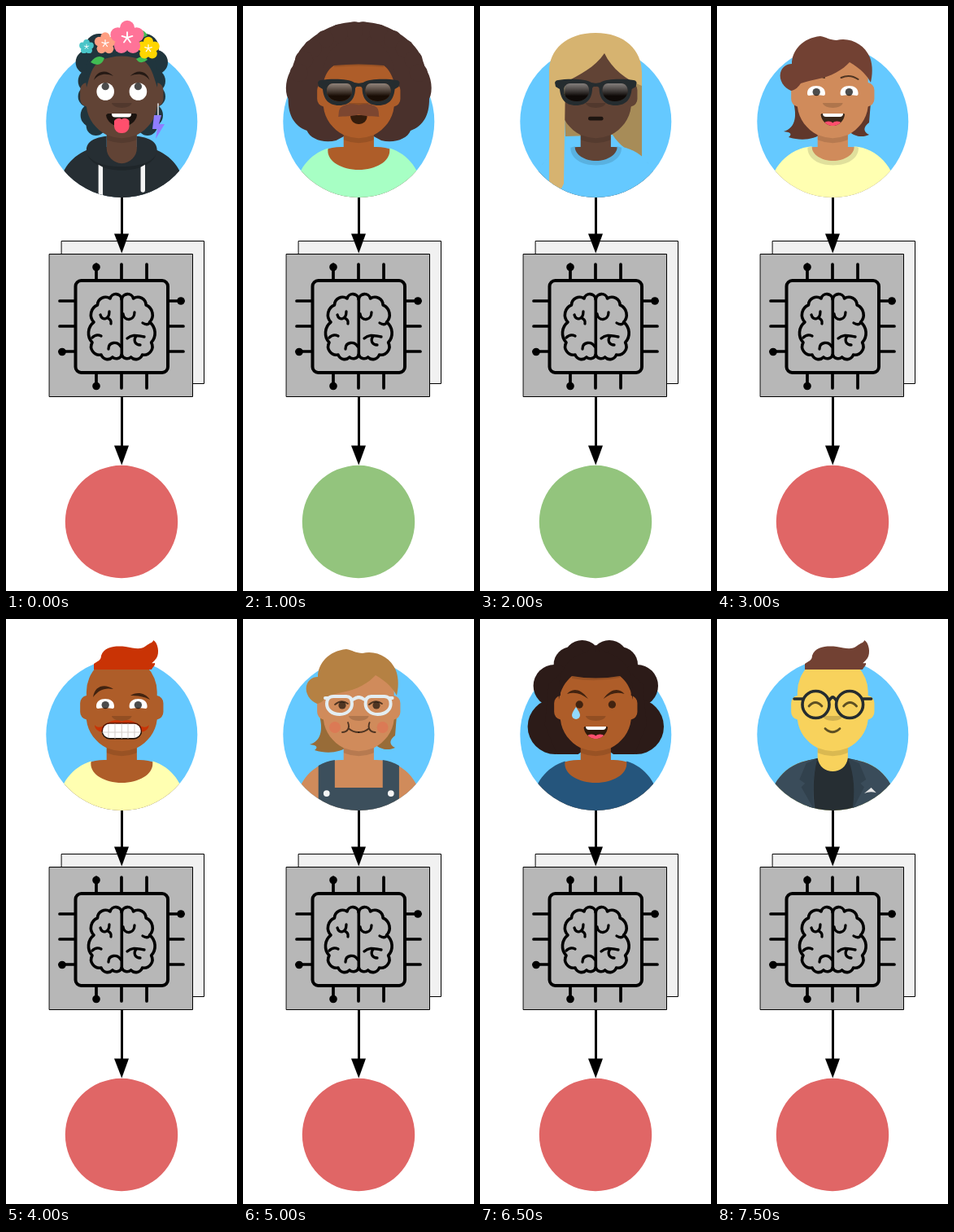
Write an HTML page with a canvas that moves like this. It is 284 by 718 pixels and loops after 8000 ms.

```html
<!DOCTYPE html>
<html lang="en">
<head>
<meta charset="utf-8">
<title>Avatars through a model</title>
<style>
html, body { margin: 0; width: 100%; height: 100%; overflow: hidden; background: #fff; }
canvas { display: block; width: 284px; height: 718px; }
</style>
</head>
<body>
<canvas id="stage"></canvas>
<script>
const STEP = 500, W = 284, H = 718, MID = 142.3;
const canvas = document.getElementById('stage');
const c = canvas.getContext('2d');
const dpr = window.devicePixelRatio || 1;
canvas.width = W * dpr;
canvas.height = H * dpr;

const INK = 'rgba(0,0,0,.62)', SHADE = 'rgba(0,0,0,.12)';
const DARK = '#614335', BROWN = '#ae5d29', TAN = '#d08b5b', YELLOW = '#f8d25c';
const RED = '#e06666', GREEN = '#93c47d', SKY = '#65c9ff', FRAME = '#252c2f';

function fill(d, color, rule) {
  c.fillStyle = color;
  c.fill(new Path2D(d), rule || 'nonzero');
}
function line(d, color, width) {
  c.strokeStyle = color;
  c.lineWidth = width;
  c.lineCap = c.lineJoin = 'round';
  c.stroke(new Path2D(d));
}
function dot(x, y, r, color) {
  c.fillStyle = color;
  c.beginPath();
  c.arc(x, y, r, 0, 7);
  c.fill();
}
function pill(x, y, w, h, r, color) {
  c.fillStyle = color;
  c.beginPath();
  c.roundRect(x, y, w, h, r);
  c.fill();
}
// Runs a drawing as it is and flipped about the face axis.
function both(draw) {
  draw();
  c.save();
  c.translate(2 * MID, 0);
  c.scale(-1, 1);
  draw();
  c.restore();
}
// Avatar space: 264 units wide, shifted down by dy.
function units(draw, dy = 0) {
  c.save();
  c.translate(40, 18);
  c.scale(.775, .775);
  c.translate(0, dy);
  draw();
  c.restore();
}

const hair = {
  fro: {
    back(col) {
      both(() => {
        fill('M142 20C165 18 189 29 204 43C216 52 221 65 224 76C232 87 234 104 229 114C229 134 222 147 206 153C202 163 186 169 170 165L142 150Z', col);
        for (let i = 0; i < 6; i++) {
          const a = -1.5 + i * .26;
          dot(MID + Math.cos(a) * 75, 95 + Math.sin(a) * 65, 11, col);
        }
      });
    },
    front(col) {
      fill('M98 98C96 60 112 40 142 40C173 40 188 60 187 98C184 86 180 78 173 73Q142 70 112 73C104 78 100 86 98 98Z', col);
      fill('M112 73Q142 70 173 73V75Q142 72 112 75Z', SHADE);
    }
  },
  curly: {
    back(col) {
      both(() => {
        [[159, 49, 23], [172, 56, 22], [193, 82, 26], [192, 132, 34]].forEach(p => dot(...p, col));
        fill('M142 32L168 50L200 80L205 130L190 166H164L142 150Z', col);
      });
    },
    front(col) {
      fill('M97 99C94 62 110 40 142 40C175 40 190 62 188 99C185 83 179 76 172 70Q142 75 113 70C105 77 99 86 97 99Z', col);
      fill('M113 70Q142 75 172 70V72Q142 78 113 73Z', SHADE);
    }
  },
  straight: {
    back(col) {
      const d = 'M102 84H199V185C183 179 171 171 163 158L105 160Z';
      fill(d, col);
      fill(d, 'rgba(0,0,0,.22)');
    },
    front(col) {
      fill('M85 216V80C85 54 106 33 142 33C178 33 199 54 199 82V98C180 91 162 77 153 58C141 76 122 84 105 94L103 218L100 224Q92 223 85 216Z', col);
    }
  },
  quiff: {
    back() {},
    front(col) {
      fill('M108 62L108 55C112 52 117 51 117 45C121 33 136 33 147 34C158 36 166 38 172 33C177 29 181 29 181 26C187 29 189 42 185 48C181 54 176 55 183 54C184 57 180 59 179 62Z', col);
    }
  },
  shag: {
    back(col) {
      const d = 'M94 118C99 138 95 150 82 154C92 155 92 158 88 161C104 166 119 164 130 156L160 152C170 162 180 161 187 158C179 154 180 148 187 143L189 118Z';
      fill(d, col);
      fill(d, 'rgba(0,0,0,.16)');
    },
    front(col) {
      fill('M91 104C82 100 76 91 78 82C80 75 85 71 92 71C92 55 105 39 127 37C134 38 139 42 147 42C164 38 181 47 188 63C192 74 191 85 189 94C185 86 177 77 163 69C155 78 140 87 122 90C114 92 108 93 103 95C100 99 97 103 91 104Z', col);
    }
  },
  flowers: {
    back(col) {
      both(() => {
        [[170, 52, 18], [184, 69, 15], [181, 92, 15], [183, 111, 13], [178, 134, 15], [174, 147, 12]]
          .forEach(p => dot(...p, col));
      });
    },
    front(col) {
      fill('M99 100C94 59 110 40 142 39C174 40 190 60 186 100C181 85 179 74 169 67Q142 56 116 67C105 74 103 87 99 100Z', col);
      fill('M104 69Q112 58 121 64Q116 77 104 69ZM156 32Q168 25 174 36Q163 44 156 32ZM160 65Q169 59 174 66Q165 73 160 65Z', '#42bc53');
      flower(99, 50, 9, '#49c5c8');
      flower(122, 46, 13.5, '#ff9f82');
      flower(175, 52, 14, '#ffd600');
      flower(149, 39, 21, '#ff7398');
      line('M187 120V136', '#e6e6e6', 1.5);
      fill('M182 134H191L188 145H195L184 163L186 151H180Z', '#8f7dff');
    }
  }
};

function flower(x, y, r, col) {
  for (let i = 0; i < 5; i++) {
    const a = -1.57 + i * Math.PI * .4, dx = Math.cos(a), dy = Math.sin(a);
    dot(x + dx * r * .58, y + dy * r * .58, r * .43, col);
  }
  dot(x, y, r * .5, col);
  for (let i = 0; i < 5; i++) {
    const a = -1.57 + i * Math.PI * .4, k = r * .32;
    line(`M${x} ${y}L${x + Math.cos(a) * k} ${y + Math.sin(a) * k}`, '#fff', r * .09);
  }
}

const clothes = {
  scoop(col) {
    fill('M181 32C211 41 232 69 232 101V110H32V101C32 68 54 41 83.5 32Q83 34 83 36C83 53 105 66 132 66S181 53 181 36Q181 34 181 32Z', col);
  },
  crew(col) {
    fill('M166 29C203 32 232 63 232 101V110H32V101C32 63 62 32 99 29V30C99 42 114 52 132.5 52S166 42 166 30Z', col);
    fill('M99 29C99 42 114 52 132.5 52S166 42 166 29L173 31C173 49 155 59 132.5 59S92 49 92 31Z', SHADE);
  },
  hoodie(col) {
    fill('M108 13C90 15 76 21 76 35C50 46 32 71 32 101V110H232V101C232 71 214 46 188 35C188 21 174 15 156 13V32C156 45 145 56 132 56S108 45 108 32Z', col);
    fill('M76 35C77 55 103 67 132 67S187 55 188 35C188 50 165 61 132 61S76 50 76 35Z', 'rgba(0,0,0,.18)');
    fill('M95 58L102 62V110H95ZM162 62L169 58V98.5A3.5 3.5 0 0 1 162 98.5Z', '#f4f4f4');
  },
  overalls(col) {
    fill('M94 30V74H170V30Q184 32 196 39V110H68V39Q80 32 94 30Z', col);
    dot(81, 83, 5, '#f4f4f4');
    dot(183, 83, 5, '#f4f4f4');
  },
  blazer(col) {
    fill('M108 27C110 41 121 48 132 48S154 41 156 27L172 31V110H92V31Z', '#262e33');
    fill('M105 29C63 31 32 63 32 101V110H104C100 81 101 54 107 30ZM159 29C201 31 232 63 232 101V110H163C168 81 166 54 157 30Z', col);
    fill('M105 29L90 35L79 61L88 67L82 73L103 110C99 81 101 54 107 30ZM159 29L174 35L185 61L176 67L182 73L163 110C168 81 166 54 157 30Z', 'rgba(0,0,0,.15)');
    fill('M182 83L193 74L201 82Q191 79 182 83Z', '#e6e6e6');
  }
};

const eyes = {
  none() {},
  plain() { both(() => dot(122.2, 105, 4.65, INK)); },
  roll() {
    both(() => {
      dot(122.2, 105, 10.8, '#fff');
      dot(122.2, 98.7, 4.65, 'rgba(0,0,0,.7)');
    });
  },
  squint() {
    both(() => {
      fill('M122 109C130 109 133 112 133 107C133 101 128 98 122 98S111 101 111 107C111 112 114 109 122 109Z', '#fff');
      dot(122.2, 105.6, 4.65, 'rgba(0,0,0,.7)');
    });
  },
  side() {
    [122, 164].forEach(x => {
      dot(x, 106, 4.6, INK);
      line(`M${x - 9} 105Q${x - 1} 98 ${x + 7} 104`, INK, 1.8);
    });
  },
  happy() { both(() => line('M113 107Q121 98 129 107', INK, 2.8)); },
  tear() {
    eyes.plain();
    fill('M118 108Q123 115 123 118A5 5 0 0 1 113 118Q113 115 118 108Z', '#92d9ff');
  }
};

const brows = {
  none() {},
  raised() { both(() => fill('M108 91C111 79 124 77 132 86C123 82 114 83 108 91Z', INK)); },
  angry() { both(() => fill('M107 92C112 86 122 83 133 98C124 91 116 89 107 92Z', INK)); },
  uneven() {
    fill('M107 96C109 82 121 79 132 86C121 84 114 87 107 96Z', INK);
    fill('M153 94C160 89 171 90 177 99C170 95 161 94 153 94Z', INK);
  },
  soft() { both(() => line('M111 90Q121 83 132 88', INK, 2)); }
};

function openMouth(d, teeth, tongue) {
  fill(d, 'rgba(0,0,0,.72)');
  c.save();
  c.clip(new Path2D(d));
  pill(...teeth, 4, '#fff');
  if (tongue) {
    dot(137, 150, 8.5, '#ff4f6d');
    dot(147.5, 150, 8.5, '#ff4f6d');
  }
  c.restore();
}

const mouths = {
  tongue() {
    openMouth('M123 134Q124 132 126 132H159Q161 132 161 134C160 142 152 148 142 148S124 142 123 134Z', [130, 124, 24, 12.4]);
    fill('M133 141C136 137 140 137 142 139C145 137 149 137 151.5 141V148A8.5 8.5 0 0 1 143 156H141.5A8.5 8.5 0 0 1 133 148Z', '#ff4f6d');
  },
  smile() {
    openMouth('M127.6 133.5Q128 132 129 132H156Q157 132 157 133.5C156 141 150 147 142.3 147S128.5 141 127.6 133.5Z', [130, 124, 25, 12], true);
  },
  grimace() {
    pill(117.5, 127.3, 49.6, 20.2, 10, 'rgba(0,0,0,.6)');
    pill(119, 128.8, 46.6, 17.2, 8.5, '#fff');
    line('M119 139H165M126 130V145M134 129V146M142.3 129V146M150 129V146M158 130V145', '#d8d3d0', 1.2);
  },
  bowl() { fill('M132 134H152.6C153 141 148 145 142.3 145S132 141 132 134Z', 'rgba(0,0,0,.7)'); },
  flat() { pill(133, 135.8, 18.6, 4.7, 2.3, 'rgba(0,0,0,.7)'); },
  grin() { line('M133 134.5Q142 143 151 134.5', INK, 2.8); },
  chew() {
    both(() => dot(113, 133, 7, 'rgba(255,70,70,.24)'));
    both(() => line('M129 127C132 134 128 139 122 139M130 134.5Q135 139 142.3 139', INK, 1.9));
  }
};

const LENS = 'M111 95H127C132 95 134 99 134 104C134 111 128 117 119 117C109 117 103 111 103 104C103 99 106 95 111 95Z';
const RIM = 'M92 94Q93 91 96 91C108 89 130 89 137 94L143 95V99Q139 98 138 101C138 113 132 122 118 122C104 122 99 113 98 102L93 99Z';

const glasses = {
  none() {},
  sun() {
    const shine = c.createLinearGradient(0, 95, 0, 117);
    shine.addColorStop(0, 'rgba(255,255,255,.45)');
    shine.addColorStop(.7, 'rgba(0,0,0,.5)');
    both(() => {
      fill(RIM + LENS, FRAME, 'evenodd');
      fill(LENS, 'rgba(0,0,0,.7)');
      fill(LENS, shine);
    });
  },
  white() {
    both(() => line(LENS + 'M135 99Q139 96 143 96M105 97H101', '#e3edf2', 4));
  },
  round() {
    both(() => line('M138 105A16.5 16.5 0 1 1 105 105A16.5 16.5 0 1 1 138 105M138 100Q140 96 143 96M106 98H95', FRAME, 3.6));
  }
};

const beards = {
  none() {},
  magnum() {
    both(() => fill('M143 122C136 119 123 120 119 126C117 130 118 135 117 136C124 135 134 136 143 133Z', '#7d4630'));
  },
  fancy() {
    both(() => fill('M143 126C136 122 127 125 121 130C116 134 111 133 109 130C109 136 115 140 123 138C130 136 136 134 143 132Z', '#c93305'));
  }
};

const CURL = '#2c1b18', UMBER = '#4a312c', GOLD = '#d6b370', OAK = '#b58143', FLAME = '#c93305', RUST = '#724133', TEAL = '#20353d';

// skin, hair, hair colour, clothes, colour, eyes, brows, mouth, glasses, beard, result
const looks = [
  [DARK, 'flowers', TEAL, 'hoodie', '#262e33', 'roll', 'raised', 'tongue', 'none', 'none', RED],
  [TAN, 'curly', CURL, 'overalls', '#3c4f5c', 'happy', 'soft', 'smile', 'none', 'none', GREEN],
  [BROWN, 'fro', UMBER, 'scoop', '#a7ffc4', 'none', 'none', 'bowl', 'sun', 'magnum', GREEN],
  [YELLOW, 'curly', RUST, 'crew', '#25557c', 'plain', 'soft', 'flat', 'round', 'none', RED],
  [DARK, 'straight', GOLD, 'crew', SKY, 'none', 'none', 'flat', 'sun', 'none', GREEN],
  [BROWN, 'curly', UMBER, 'blazer', '#3a4c5a', 'plain', 'uneven', 'grin', 'none', 'none', GREEN],
  [TAN, 'shag', RUST, 'crew', '#ffffb1', 'squint', 'soft', 'smile', 'none', 'none', RED],
  [DARK, 'shag', CURL, 'scoop', '#a7ffc4', 'happy', 'raised', 'grin', 'none', 'none', GREEN],
  [BROWN, 'quiff', FLAME, 'scoop', '#ffffb1', 'squint', 'uneven', 'grimace', 'none', 'fancy', RED],
  [YELLOW, 'straight', OAK, 'hoodie', '#25557c', 'plain', 'soft', 'smile', 'none', 'none', GREEN],
  [TAN, 'shag', OAK, 'overalls', '#3c4f5c', 'side', 'none', 'chew', 'white', 'none', RED],
  [BROWN, 'flowers', TEAL, 'scoop', '#a7ffc4', 'happy', 'raised', 'smile', 'none', 'none', GREEN],
  [TAN, 'straight', CURL, 'blazer', '#3a4c5a', 'plain', 'angry', 'flat', 'none', 'none', GREEN],
  [BROWN, 'curly', CURL, 'scoop', '#25557c', 'tear', 'angry', 'smile', 'none', 'none', RED],
  [DARK, 'straight', UMBER, 'hoodie', '#262e33', 'squint', 'raised', 'grin', 'none', 'none', GREEN],
  [YELLOW, 'quiff', RUST, 'blazer', '#3a4c5a', 'happy', 'none', 'grin', 'round', 'none', RED]
];

function body(skin) {
  fill('M156 181V200H160A71 71 0 0 1 231 271V280H33V271A71 71 0 0 1 104 200H108V181C91 172 78 156 76 136A12 12 0 0 1 66 124V110A12 12 0 0 1 76 98V92A56 56 0 0 1 188 92V98A12 12 0 0 1 198 110V124A12 12 0 0 1 188 136C186 156 173 172 156 181Z', skin);
  // The chin's shadow falls on the neck only.
  c.save();
  c.clip(new Path2D('M108 170H156V210H108Z'));
  fill('M188 130V138A56 56 0 0 1 76 138V130A56 56 0 0 0 188 130Z', SHADE);
  c.restore();
}

function avatar([skin, cut, tint, wear, cloth, eye, brow, mouth, lens, beard]) {
  units(() => dot(132, 160, 120, SKY));
  c.save();
  const mask = new Path2D();
  mask.addPath(new Path2D('M12 160A120 120 0 0 0 252 160V-20H12Z'), new DOMMatrix([.775, 0, 0, .775, 40, 18]));
  c.clip(mask);
  hair[cut].back(tint);
  units(() => body(skin));
  units(() => clothes[wear](cloth), 170);
  eyes[eye]();
  brows[brow]();
  fill('M130 119C130 122 136 125 142.3 125S154.6 122 154.6 119Z', 'rgba(0,0,0,.16)');
  mouths[mouth]();
  beards[beard]();
  if (mouth === 'grimace') mouths.grimace();
  hair[cut].front(tint);
  glasses[lens]();
  c.restore();
}

function box(x, y, w, h, col) {
  c.fillStyle = col;
  c.fillRect(x, y, w, h);
  c.strokeStyle = '#000';
  c.lineWidth = 1;
  c.strokeRect(x, y, w, h);
}

function arrow(from, to) {
  c.fillStyle = '#000';
  c.fillRect(141, from, 3, to - from - 20);
  fill(`M133 ${to - 24}H151L142.3 ${to}Z`, '#000');
}

function chip() {
  box(68.5, 288.5, 175, 175, '#f1f1f1');
  box(53.5, 304.5, 176, 175, '#b7b7b7');
  c.lineWidth = 4;
  c.beginPath();
  c.roundRect(85.5, 337, 113.5, 113, 7);
  c.stroke();
  [111, 142, 173].forEach(x => line(`M${x} 317V336M${x} 451V469`, '#000', 3.7));
  [362, 393, 424].forEach(y => line(`M66 ${y}H85M200 ${y}H218`, '#000', 3.7));
  [[111, 320.5], [111, 466.5], [69, 424.5], [215, 362]].forEach(p => dot(...p, 4.8, '#000'));
  both(() => line('M142.3 360A7.3 7.3 0 0 0 128 359A10 10 0 0 0 112.5 367A13 13 0 0 0 108 388A17 17 0 0 0 106 413A10.2 10.2 0 0 0 117 428A8.4 8.4 0 0 0 131 431A7 7 0 0 0 142.3 428', '#000', 3.6));
  line('M142.3 359V428', '#000', 3.6);
  line('M116 379C118 387 127 385 127 375M125 383Q130 385 129 390M106 407Q111 402 117 405M126 421C126 412 137 411 141 418M144 378C145 387 158 387 158 376M149 408C156 402 162 405 170 406M160 405C156 411 159 416 165 416M177 388C175 392 171 391 168 389', '#000', 3.3);
}

function draw(now) {
  const look = looks[Math.floor(Math.max(0, now) / STEP) % looks.length];
  c.setTransform(dpr, 0, 0, dpr, 0, 0);
  c.fillStyle = '#fff';
  c.fillRect(0, 0, W, H);
  avatar(look);
  chip();
  arrow(235, 303.5);
  arrow(480, 563.5);
  dot(142, 633, 69.2, look[10]);
  requestAnimationFrame(draw);
}
draw(performance.now());
</script>
</body>
</html>
```
